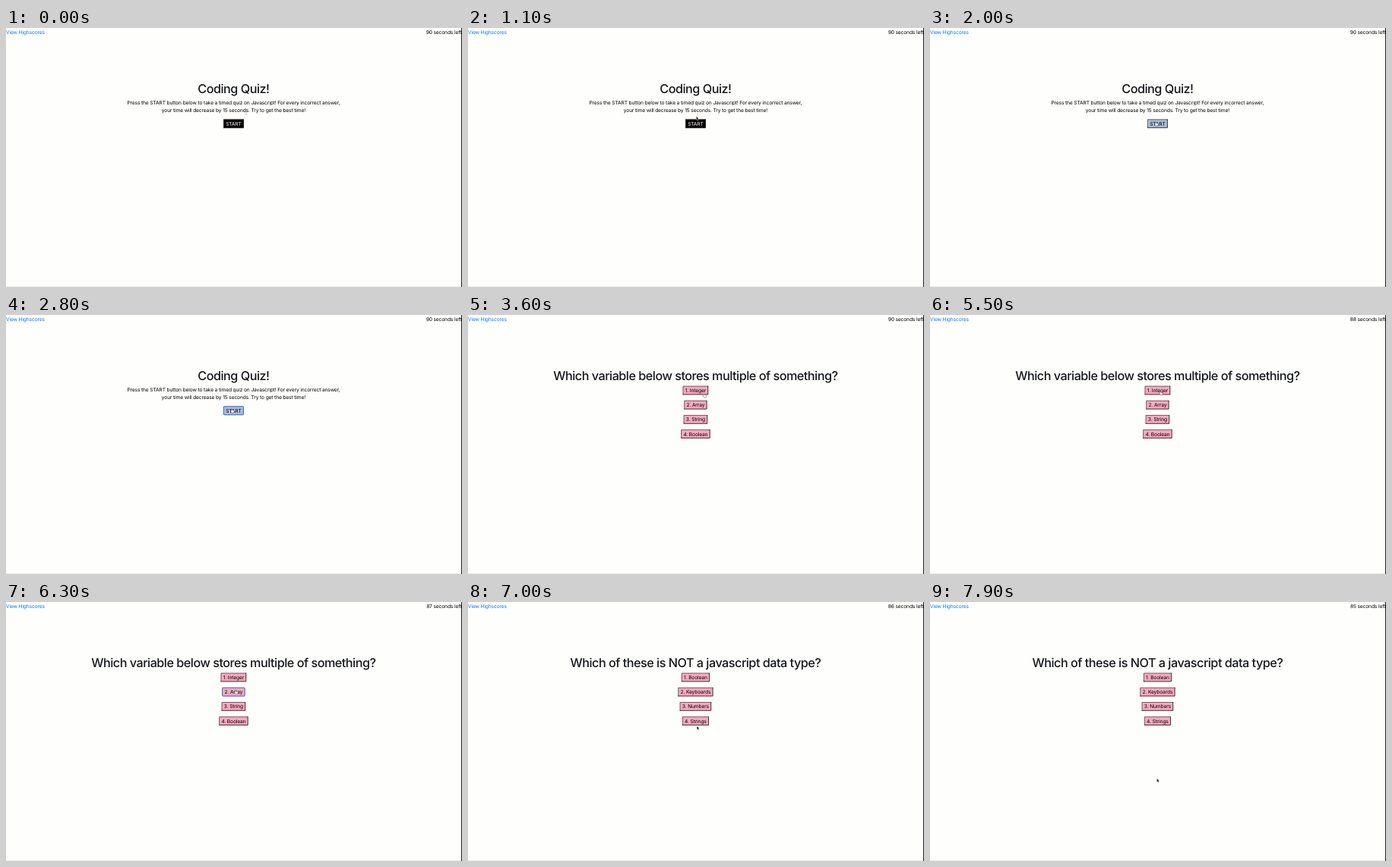
Recreate the animation shown at these times as an HTML page. Size 600 by 342 pixels, loop 8 s.

```html
<!DOCTYPE html>
<html lang="en">
<head>
<meta charset="utf-8">
<title>Coding Quiz</title>
<style>
  html, body { margin: 0; width: 100%; height: 100%; overflow: hidden; background: #fefefc; }
  svg { display: block; width: 600px; height: 342px; }
  text {
    font: 6.67px Inter, "Open Sans", sans-serif;
    letter-spacing: -.14px;
    text-rendering: geometricPrecision;
    text-anchor: middle;
  }
  .title { font-size: 16.2px; font-weight: 500; letter-spacing: -.49px; fill: #14171a; }
  .link { text-anchor: start; fill: #007bff; }
  .timer { text-anchor: end; }
</style>
</head>
<body>
<svg id="stage" viewBox="0 0 600 342"></svg>
<script>
const LOOP = 8000, QUIZ = 2900, NEXT = 6400, PRESS = 100, MID = 299.4;
const stage = document.getElementById("stage");

const questions = [
  ["Which variable below stores multiple of something?", "Integer", "Array", "String", "Boolean"],
  ["Which of these is NOT a javascript data type?", "Boolean", "Keyboards", "Numbers", "Strings"]
];

// Each pointer move: departure, arrival, destination
const origin = [316, 111];
const moves = [
  [0, 300, 309, 100],
  [750, 1500, 297, 123.5],
  [3300, 3600, 310.5, 103.5],
  [3600, 4200, 300, 154],
  [4400, 5300, 303, 100],
  [5500, 5900, 300, 154],
  [5900, 6200, 302, 116],
  [6800, 7700, 300, 237],
  [7700, 7900, 298.5, 233]
];

const pointers = {
  arrow: '<path d="M0 0V4.8L1.1 3.8L1.9 5.5L2.7 5.1L1.9 3.5H3.3Z" stroke="#fff" stroke-width=".35"/>',
  hand: '<path d="M-.5 .4Q0-.4 .5 .4V2L2.9 2.6Q3.4 2.8 3.3 3.6L2.8 5.6H.1L-1.6 3.3Q-1.5 2.6-.5 3.2Z" fill="#fff" stroke="#333" stroke-width=".4"/>',
  beam: '<path d="M-1-3.2Q0-3.2 0-2.5Q0-3.2 1-3.2M0-2.5V2.5M-1 3.2Q0 3.2 0 2.5Q0 3.2 1 3.2" fill="none" stroke="#777" stroke-width=".4"/>'
};

const text = (x, y, str, cls = "") => `<text x="${x}" y="${y}" class="${cls}">${str}</text>`;

function textWidth(str) {
  stage.innerHTML = text(0, 0, str);
  return stage.firstChild.getComputedTextLength();
}

const makeButton = (label, y, fill) => ({ label, y, fill, w: textWidth(label) + 6.3 });

const startButton = makeButton("START", 126.3, "#000");
const optionButtons = questions.map(([, ...options]) =>
  options.map((name, i) => makeButton(`${i + 1}. ${name}`, 99.5 + 19.2 * i, "#f5a9bf")));

function pointerAt(t) {
  let [x, y] = origin;
  for (const [from, to, toX, toY] of moves) {
    const k = Math.min(1, Math.max(0, (t - from) / (to - from)));
    const ease = k * (2 - k);
    x += (toX - x) * ease;
    y += (toY - y) * ease;
  }
  return [x, y];
}

const inside = ([x, y], b) => Math.abs(x - MID) < b.w / 2 && Math.abs(y - b.y) < 6;

function drawButton({ label, w, y, fill }, focus, color = "#000") {
  const h = 11.6, x = MID - w / 2, top = y - h / 2;
  const edge = focus
    ? `<rect x="${x + .3}" y="${top + .3}" width="${w - .6}" height="${h - .6}" rx="1" fill="none" stroke="#2f6bd0" stroke-width="1"/>`
    : `<path d="M${x + .4} ${top + h}V${top + .4}H${x + w}" fill="none" stroke="#5c484e" stroke-width=".8"/>
       <path d="M${x} ${top + h - .4}H${x + w - .4}V${top}" fill="none" stroke="#1c1416" stroke-width=".8"/>`;
  return `<rect x="${x}" y="${top}" width="${w}" height="${h}" fill="${fill}"/>${edge}
    <text x="${MID}" y="${y + 2.5}" fill="${color}">${label}</text>`;
}

function drawStart(t, pos) {
  const hover = inside(pos, startButton);
  const look = hover ? { ...startButton, fill: "#a9bbdc" } : startButton;
  return text(MID, 86.2, "Coding Quiz!", "title") +
    text(MID, 101, "Press the START button below to take a timed quiz on Javascript! For every incorrect answer,") +
    text(MID, 110.8, "your time will decrease by 15 seconds. Try to get the best time!") +
    drawButton(look, t >= QUIZ - PRESS, hover ? "#000" : "#fff");
}

function drawQuestion(t, n) {
  const pressed = n === 0 && t >= NEXT - PRESS;
  return text(MID, 86.2, questions[n][0], "title") +
    optionButtons[n].map((b, i) => drawButton(b, pressed && i === 1)).join("");
}

function render(t) {
  const pos = pointerAt(t);
  const left = 90 - Math.max(0, Math.floor((t - QUIZ) / 1000));
  const intro = t < QUIZ, n = t < NEXT ? 0 : 1;
  const buttons = intro ? [startButton] : optionButtons[n];
  const overText = intro && pos[1] > 93 && pos[1] < 113;
  const kind = buttons.some(b => inside(pos, b)) ? "hand" : overText ? "beam" : "arrow";

  stage.innerHTML = `<rect width="600" height="342" fill="#fefefc"/>
    <rect y="341" width="600" height="1" fill="#ececea"/>
    <rect x="599" width="1" height="342" fill="#222"/>
    ${text(0, 7.7, "View Highscores", "link")}
    ${text(599.3, 7.7, left + " seconds left", "timer")}
    ${intro ? drawStart(t, pos) : drawQuestion(t, n)}
    <g transform="translate(${pos})">${pointers[kind]}</g>`;
}

const begin = performance.now();
let shown = -1;

function tick() {
  // The picture advances ten times per second.
  const t = Math.floor((performance.now() - begin) % LOOP / 100) * 100;
  if (t !== shown) render(shown = t);
  requestAnimationFrame(tick);
}
tick();
</script>
</body>
</html>
```
